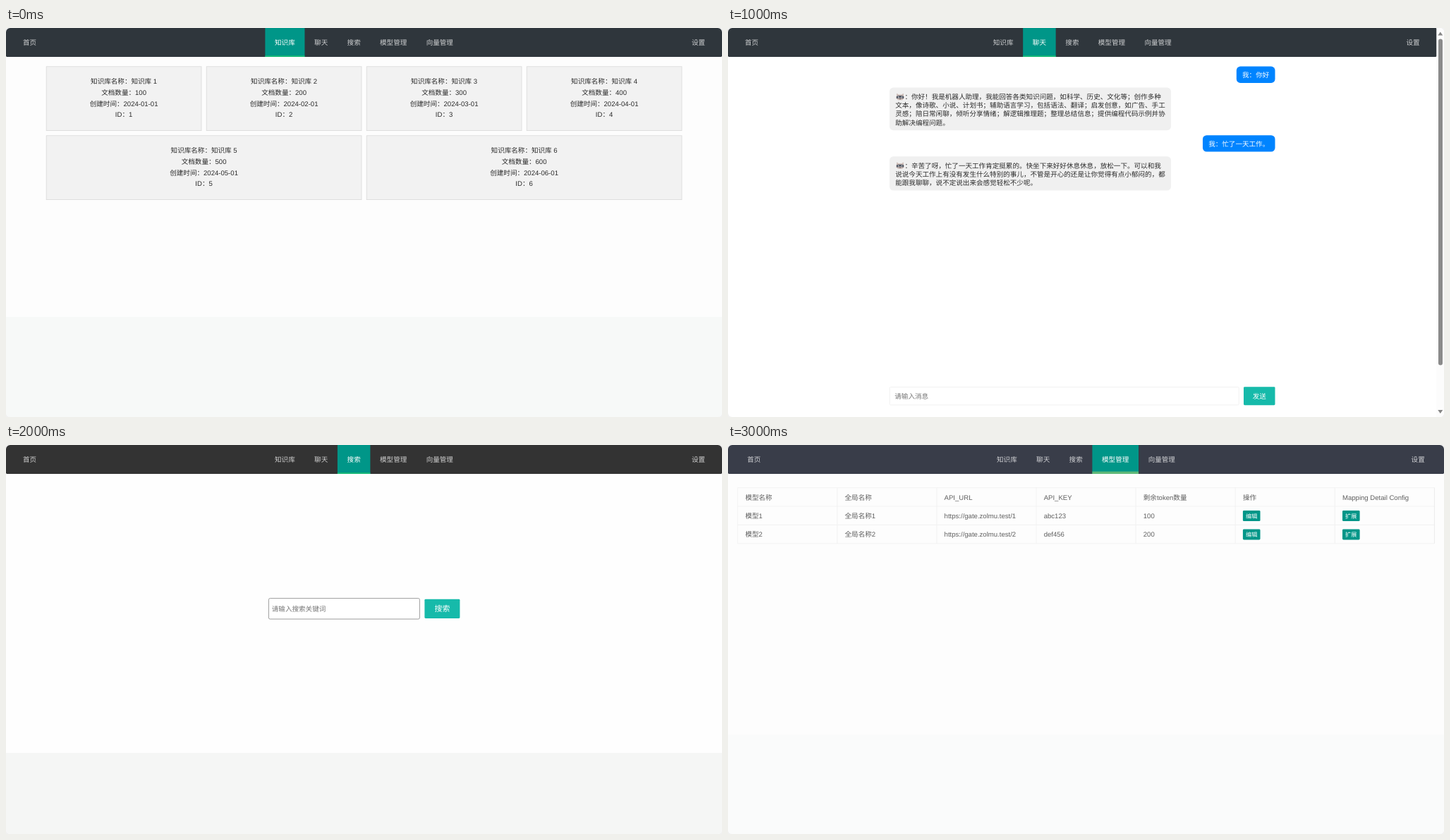
Write an HTML page that moves like this. It is 1015 by 552 pixels and loops after 4000 ms.

```html
<!DOCTYPE html>
<html>
<head>
<meta charset="utf-8">
<title>Admin pages</title>
<style>
  html, body { margin: 0; width: 100%; height: 100%; overflow: hidden; background: #f0f0f0; }
  svg { display: block; width: 1015px; height: 552px; border-radius: 6px; }
  text {
    font: 9.57px "Liberation Sans", "Noto Sans CJK SC", "Noto Sans CJK", sans-serif;
    text-rendering: geometricPrecision;
    white-space: pre;
  }
</style>
</head>
<body>
<svg id="stage" viewBox="0 0 1015 552"></svg>
<script>
const EM = 9.57, PAD = 13.67, TEAL = '#009688', MINT = '#16baaa';

const rect = (x, y, w, h, fill, r = 0, stroke = 'none') =>
  `<rect x="${x}" y="${y}" width="${w}" height="${h}" rx="${r}" fill="${fill}" stroke="${stroke}" stroke-width=".8"/>`;
// y is the middle of the line
const text = (s, x, y, fill, anchor = 'start', size = EM) =>
  `<text x="${x}" y="${y + size * 0.375}" fill="${fill}" text-anchor="${anchor}" style="font-size:${size}px">${s}</text>`;
const line = (x1, y1, x2, y2, color) =>
  `<path d="M${x1} ${y1}L${x2} ${y2}" stroke="${color}" stroke-width=".8"/>`;
const button = (s, x, y, w, h, fill, size) =>
  rect(x, y, w, h, fill, 1.4) + text(s, x + w / 2, y + h / 2, '#fff', 'middle', size);

function nav(active, { bg, width = 1015, edge = 24, bar = 2, barColor = '#16b777' }) {
  const items = ['知识库', '聊天', '搜索', '模型管理', '向量管理'];
  const widths = items.map(s => s.length * EM + 2 * PAD);
  const dim = 'rgba(255,255,255,.76)';
  let x = (width - widths.reduce((a, b) => a + b)) / 2;
  let out = rect(0, 0, width, 41, bg, 1.4) + text('首页', edge, 20.5, dim) +
    text('设置', width - edge, 20.5, dim, 'end');
  items.forEach((s, i) => {
    const on = i === active, w = widths[i];
    if (on) out += rect(x, 0, w, 41, TEAL) + rect(x, 41 - bar, w, bar, barColor);
    out += text(s, x + PAD, 20.5, on ? '#fff' : dim);
    x += w;
  });
  return out;
}

const page = (top, split, bottom) => rect(0, 0, 1015, 552, top) + rect(0, split, 1015, 552 - split, bottom);

function library() {
  let out = page('#fdfdfd', 410, '#f7f9f8') + nav(0, { bg: '#2f363c' });
  for (let n = 1; n <= 6; n++) {
    const wide = n > 4;
    const x = 57.2 + (wide ? (n - 5) * 454 : (n - 1) * 227);
    const y = wide ? 152.8 : 54.8, w = wide ? 446.8 : 219.8;
    out += rect(x, y, w, 90.8, '#f2f2f2', 0, '#d9d9d9');
    [`知识库名称：知识库 ${n}`, `文档数量：${n}00`, `创建时间：2024-0${n}-01`, `ID：${n}`]
      .forEach((s, i) => out += text(s, x + w / 2, y + 20.7 + i * 15.75, '#2b2b2b', 'middle'));
  }
  return out;
}

const face = (x, y) => `<g transform="translate(${x} ${y})">
  <path d="M1 5L1.2 .2 4 2H8L10.8 .2 11 5 12 7 9 9.6H3L0 7Z" fill="#c9b9b4"/>
  <path d="M.6 4.4Q6 2.6 11.4 4.4L10.8 7.4 7.4 7 6 5.6 4.6 7 1.2 7.4Z" fill="#4b5360"/>
  <circle cx="3.6" cy="5.5" r=".8" fill="#fff"/><circle cx="8.4" cy="5.5" r=".8" fill="#fff"/>
  <circle cx="6" cy="7.8" r=".8" fill="#39383c"/></g>`;

const mine = (s, y) => {
  const w = s.length * EM + 16.4;
  return rect(775.5 - w, y, w, 23.3, '#0084ff', 5.5) + text(s, 783.7 - w, y + 12.2, '#fff');
};
const reply = (lines, y) =>
  rect(229, y, 399, 11.6 + lines.length * 12.25, '#f0f0f0', 5.5) + face(238, y + 8) +
  lines.map((s, i) => text(s, i ? 237.2 : 250.4, y + 12.8 + i * 12.25, '#2b2b2b')).join('');

function chat() {
  return page('#fff', 552, '#fff') + nav(1, { bg: '#2f363c', width: 1004.5 }) +
    mine('我：你好', 54.6) +
    reply(['：你好！我是机器人助理，我能回答各类知识问题，如科学、历史、文化等；创作多种',
      '文本，像诗歌、小说、计划书；辅助语言学习，包括语法、翻译；启发创意，如广告、手工',
      '灵感；陪日常闲聊，倾听分享情绪；解逻辑推理题；整理总结信息；提供编程代码示例并协',
      '助解决编程问题。'], 84.6) +
    mine('我：忙了一天工作。', 152.2) +
    reply(['：辛苦了呀，忙了一天工作肯定挺累的。快坐下来好好休息休息，放松一下。可以和我',
      '说说今天工作上有没有发生什么特别的事儿，不管是开心的还是让你觉得有点小郁闷的，都',
      '能跟我聊聊，说不定说出来会感觉轻松不少呢。'], 182.2) +
    rect(229.2, 509.5, 495, 25.4, '#fff', 1.4, '#eee') + text('请输入消息', 236.3, 522, '#757575') +
    button('发送', 731, 509.2, 44.5, 26, MINT) +
    rect(1004.5, 0, 10.5, 552, '#fcfcfc') + rect(1007, 15.5, 6, 463, '#8b8b8b', 3) +
    '<path d="M1006.3 10.5L1009.8 5.5 1013.3 10.5ZM1006.3 542L1009.8 547 1013.3 542Z" fill="#858585"/>';
}

function search() {
  return page('#fefefe', 437, '#f5f6f5') + nav(2, { bg: '#333' }) +
    rect(372.4, 217.6, 214, 29.4, '#fff', 2, '#858585') +
    text('请输入搜索关键词', 376.8, 232.4, '#757575') +
    button('搜索', 593.4, 218.8, 50, 27.2, MINT, 10.93);
}

function models() {
  const rows = [
    ['模型名称', '全局名称', 'API_URL', 'API_KEY', '剩余token数量', '操作', 'Mapping Detail Config'],
    ['模型1', '全局名称1', 'https://gate.zolmu.test/1', 'abc123', '100', '编辑', '扩展'],
    ['模型2', '全局名称2', 'https://gate.zolmu.test/2', 'def456', '200', '编辑', '扩展']
  ];
  const colX = i => 13.7 + i * 141.1, rowY = i => 60.6 + i * 26.4;
  let out = page('#fdfdfd', 411, '#fafbfb') +
    nav(3, { bg: '#393d49', edge: 27.3, bar: 3.4, barColor: '#5fb878' });
  for (let i = 0; i < 4; i++) out += line(colX(0), rowY(i), colX(7), rowY(i), '#f0f0f0');
  for (let i = 0; i < 8; i++) out += line(colX(i), rowY(0), colX(i), rowY(3), i < 7 ? '#f0f0f0' : '#e6e6e6');
  rows.forEach((row, r) => row.forEach((s, c) => {
    const x = colX(c) + 10.7, y = rowY(r) + 13.4;
    out += r && c > 4.5 ? button(s, x, y - 7.3, 24.6, 15, TEAL, 8.2) : text(s, x, y, '#5f5f5f');
  }));
  return out;
}

const stage = document.getElementById('stage');
stage.innerHTML = [library, chat, search, models].map(draw => `<g>${draw()}</g>`).join('');
const views = [...stage.children];

function tick(now) {
  const current = Math.floor(now % 4000 / 1000);
  views.forEach((g, i) => g.style.display = i === current ? '' : 'none');
  requestAnimationFrame(tick);
}
tick(performance.now());
</script>
</body>
</html>
```
